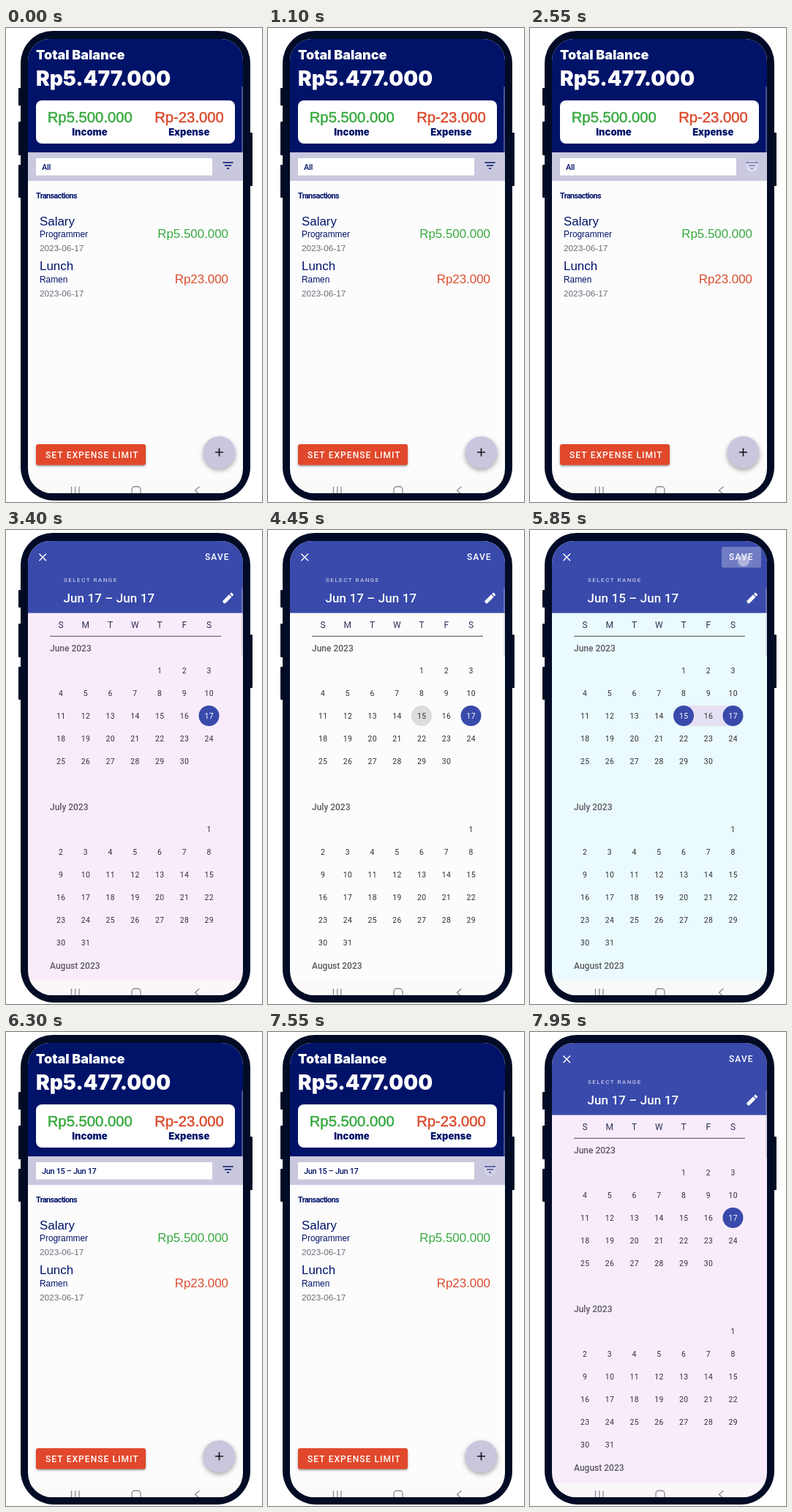
These frames come from a looping animation (350x648 px, 8000 ms). An HTML page with a canvas:

```html
<!DOCTYPE html>
<html lang="en">
<head>
<meta charset="utf-8">
<title>Expense tracker</title>
<style>
html, body { margin: 0; width: 100%; height: 100%; overflow: hidden; background: #fff; }
canvas { display: block; width: 100vw; height: 100vh; }
</style>
</head>
<body>
<canvas id="stage"></canvas>
<script>
const W = 350, H = 648, LOOP = 8000;
const canvas = document.getElementById('stage');
const ctx = canvas.getContext('2d');

const FRAME = '#020b25', NAVY = '#001369', INDIGO = '#394aab';
const GREEN = '#37a93f', RED = '#dc4a2b', INK = '#303036';
const HEAVY = 'Inter, sans-serif', SANS = '"Liberation Sans", sans-serif', UI = 'Roboto, sans-serif';

const clamp = v => Math.max(0, Math.min(1, v));
const ramp = (t, start, length) => clamp((t - start) / length);
const easeOut = p => 1 - (1 - p) * (1 - p);
const between = (t, a, b) => t >= a && t < b;

function rect(x, y, w, h, fill, r = 0) {
  ctx.fillStyle = fill;
  ctx.beginPath();
  ctx.roundRect(x, y, w, h, r);
  ctx.fill();
}

function disc(x, y, r, fill) {
  ctx.fillStyle = fill;
  ctx.beginPath();
  ctx.arc(x, y, r, 0, Math.PI * 2);
  ctx.fill();
}

function line(points, color, width) {
  ctx.strokeStyle = color;
  ctx.lineWidth = width;
  ctx.beginPath();
  points.forEach(([x, y], i) => i ? ctx.lineTo(x, y) : ctx.moveTo(x, y));
  ctx.stroke();
}

function text(str, x, y, size, fill, { family = UI, weight = 400, align = 'left', gap = 0, bold = 0 } = {}) {
  ctx.font = `${weight} ${size}px ${family}`;
  ctx.letterSpacing = `${gap}px`;
  ctx.textAlign = align;
  ctx.fillStyle = fill;
  ctx.fillText(str, x, y);
  if (bold) {
    ctx.strokeStyle = fill;
    ctx.lineWidth = bold;
    ctx.strokeText(str, x, y);
  }
}

function shadowed(blur, dy, alpha, draw) {
  const scale = ctx.getTransform().a;
  ctx.save();
  ctx.shadowColor = `rgba(0,0,0,${alpha})`;
  ctx.shadowBlur = blur * scale;
  ctx.shadowOffsetY = dy * scale;
  draw();
  ctx.restore();
}

// A finger dot that appears for the length of a press.
function touch(t, start, end, x, y) {
  const a = Math.min(ramp(t, start, 60), 1 - ramp(t, end - 60, 60));
  if (a > 0) disc(x, y, 8, `rgba(235,235,250,${0.5 * a})`);
}

function phoneBody() {
  rect(17, 82, 6, 24, FRAME, 1);
  rect(17, 128, 6, 46, FRAME, 1);
  rect(17, 187, 6, 45, FRAME, 1);
  rect(331, 143, 6, 73, FRAME, 1);
  rect(20, 4, 314, 642, FRAME, [44, 44, 46, 46]);
}

function entry(y, title, note, amount, color) {
  const sans = { family: SANS };
  text(title, 46, y, 16.9, NAVY, sans);
  text(note, 46, y + 16.3, 11.9, NAVY, sans);
  text('2023-06-17', 46, y + 35.3, 11.8, '#6c6b76', sans);
  text(amount, 304, y + 17.2, 16.9, color, { family: SANS, align: 'right' });
}

function home(t) {
  rect(29, 14, 296, 623, '#fcfcfd');
  rect(29, 14, 296, 156, NAVY);
  text('Total Balance', 41, 43.3, 18, '#fff', { family: HEAVY, weight: 900 });
  text('Rp5.477.000', 41, 79, 28, '#fff', { family: HEAVY, weight: 900 });

  rect(41, 99, 272, 59, '#fff', 8);
  const sum = { family: SANS, align: 'center', bold: 0.5 };
  const label = { family: HEAVY, weight: 900, align: 'center' };
  text('Rp5.500.000', 114.8, 128.8, 20.3, GREEN, sum);
  text('Rp-23.000', 250.5, 128.8, 20.3, RED, sum);
  text('Income', 114.5, 147, 13, NAVY, label);
  text('Expense', 250.2, 147, 13, NAVY, label);

  rect(29, 170, 296, 39, '#c9c8de');
  rect(41, 178, 241, 23.5, '#fff');
  const narrow = { weight: 500, gap: -0.35 };
  text(t < 6000 ? 'All' : 'Jun 15 – Jun 17', 49, 193.5, 11, NAVY, narrow);
  [[7.2, 184], [4.6, 188], [1.6, 192]].forEach(([half, y]) =>
    line([[303.5 - half, y], [303.5 + half, y]], NAVY, 1.5));
  touch(t, 2460, 2700, 303.5, 189);
  touch(t, 7520, 7720, 303.5, 189);

  text('Transactions', 41, 233, 10.8, NAVY, { weight: 600, gap: -0.6 });
  entry(270, 'Salary', 'Programmer', 'Rp5.500.000', GREEN);
  entry(331.3, 'Lunch', 'Ramen', 'Rp23.000', RED);

  shadowed(3, 1.5, 0.4, () => rect(41, 569, 150, 28.5, '#e1482b', 3));
  text('SET EXPENSE LIMIT', 54, 587.7, 12, '#fff', { weight: 500, gap: 1.05 });
  shadowed(6, 2.5, 0.35, () => disc(291.5, 580.3, 22, '#c9c7dd'));
  line([[286, 580], [297, 580]], '#15151d', 1.7);
  line([[291.5, 574.5], [291.5, 585.5]], '#15151d', 1.7);
}

const colX = c => 75 + c * 33.75;

function month(name, top, firstCol, days, marked = []) {
  text(name, 60, top + 4.3, 12, '#5b5b60', { weight: 500 });
  for (let d = 1; d <= days; d++) {
    const cell = firstCol + d - 1;
    text(String(d), colX(cell % 7) + 0.2, top + 34.8 + 31 * Math.floor(cell / 7), 10.4,
      marked.includes(d) ? '#fff' : INK, { align: 'center', gap: 0.4 });
  }
}

// State of the date selection at a given time.
function selection(t) {
  if (between(t, 4520, 5200)) return { title: 'Jun 15 – End Date', marked: [15], paper: '#fcfcfc' };
  if (between(t, 5200, 7000)) return { title: 'Jun 15 – Jun 17', marked: [15, 17], paper: '#ebfafc' };
  return { title: 'Jun 17 – Jun 17', marked: [17], paper: between(t, 4340, 4520) ? '#fcfcfc' : '#f9ecfa' };
}

function press(t, start, end, x) {
  const a = Math.min(ramp(t, start, 80), 1 - ramp(t, end, 120));
  if (a > 0) disc(x, 254, 14, `rgba(90,90,90,${0.2 * a})`);
}

function pencil(x, y) {
  ctx.save();
  ctx.translate(x, y);
  ctx.rotate(-Math.PI / 4);
  ctx.fillStyle = '#fff';
  ctx.beginPath();
  ctx.moveTo(-9.5, 0);
  ctx.lineTo(-8.2, -2.4);
  ctx.lineTo(4.2, -2.4);
  ctx.lineTo(4.2, 2.4);
  ctx.lineTo(-8.2, 2.4);
  ctx.fill();
  ctx.restore();
  ctx.save();
  ctx.translate(x, y);
  ctx.rotate(-Math.PI / 4);
  rect(5.4, -2.4, 3.2, 4.8, '#fff', 1);
  ctx.restore();
}

function picker(t) {
  const { title, marked, paper } = selection(t);
  rect(29, 14, 296, 623, paper);
  rect(29, 14, 296, 99.5, INDIGO);

  line([[45.5, 32.5], [55, 42]], '#fff', 1.5);
  line([[55, 32.5], [45.5, 42]], '#fff', 1.5);
  const glow = Math.min(ramp(t, 5680, 120), 1 - ramp(t, 6020, 100));
  if (glow > 0) rect(262, 23, 54, 28.5, `rgba(255,255,255,${0.28 * glow})`, 3);
  text('SAVE', 272, 41.3, 12, '#fff', { weight: 500, gap: 1.1 });
  touch(t, 5680, 5960, 292, 42);
  text('SELECT RANGE', 79, 70.8, 8, '#e3e5f5', { gap: 1.5 });
  text(title, 78.5, 98.8, 17, '#fff', { weight: 500, gap: 0.1 });
  pencil(303.8, 93);

  [...'SMTWTFS'].forEach((d, c) =>
    text(d, colX(c), 133.8, 12, '#2b3056', { align: 'center' }));
  line([[60, 145.2], [294, 145.2]], '#464a48', 1.1);

  if (marked.length > 1) rect(colX(4), 240, colX(6) - colX(4), 28, '#e5e0f3');
  marked.forEach(d => disc(colX(d - 11), 254, 14, INDIGO));
  press(t, 4340, 4520, colX(4));
  press(t, 5040, 5200, colX(6));

  month('June 2023', 161.3, 4, 30, marked);
  month('July 2023', 378.3, 6, 31);
  text('August 2023', 60, 599.6, 12, '#5b5b60', { weight: 500 });
}

function systemBar() {
  rect(29, 616, 296, 21, 'rgba(251,250,248,0.75)');
  const grey = '#8b8b90';
  [89.5, 94.8, 100].forEach(x => line([[x, 627], [x, 638]], grey, 1.3));
  ctx.strokeStyle = grey;
  ctx.lineWidth = 1.3;
  ctx.beginPath();
  ctx.roundRect(172, 627, 12, 12, 4);
  ctx.stroke();
  line([[264.5, 627], [258.5, 632.3], [264.5, 637.5]], grey, 1.3);
}

// Opacity of the picker page.
function pickerAlpha(t) {
  if (t < 6500) return easeOut(ramp(t, 2680, 160)) * (1 - easeOut(ramp(t, 5980, 160)));
  return easeOut(ramp(t, 7740, 180));
}

function draw(t) {
  ctx.fillStyle = '#fff';
  ctx.fillRect(0, 0, W, H);
  phoneBody();

  ctx.save();
  ctx.beginPath();
  ctx.roundRect(30, 15, 294, 621, [30, 30, 33, 33]);
  ctx.clip();
  const alpha = pickerAlpha(t);
  if (alpha < 1) home(t);
  if (alpha > 0) {
    rect(29, 14, 296, 623, `rgba(0,0,0,${0.54 * alpha})`);
    ctx.globalAlpha = alpha;
    picker(t);
    ctx.globalAlpha = 1;
  }
  systemBar();
  rect(322, 80, 3, 92, 'rgba(180,180,205,0.4)', 1);
  ctx.restore();
}

function resize() {
  const ratio = window.devicePixelRatio || 1;
  canvas.width = Math.round(innerWidth * ratio);
  canvas.height = Math.round(innerHeight * ratio);
}

function tick() {
  ctx.setTransform(canvas.width / W, 0, 0, canvas.height / H, 0, 0);
  draw(performance.now() % LOOP);
  requestAnimationFrame(tick);
}

addEventListener('resize', resize);
resize();
tick();
</script>
</body>
</html>
```
